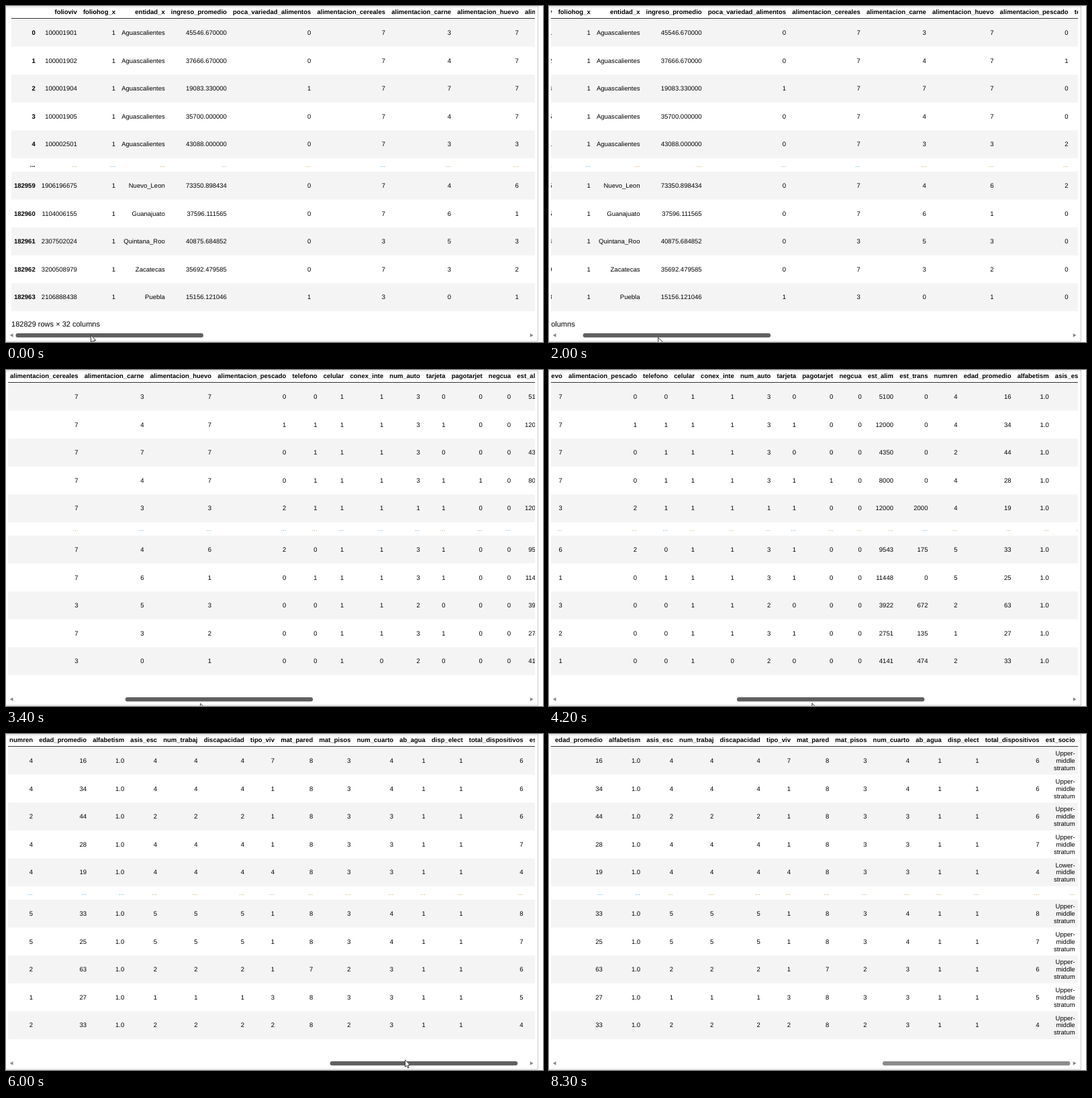
Write an HTML page with a canvas that moves like this. It is 800 by 501 pixels and loops after 8.4 s.

```html
<!DOCTYPE html>
<html lang="es">
<head>
<meta charset="utf-8">
<style>
html, body { margin: 0; width: 100%; height: 100%; overflow: hidden; background: #fff; }
canvas { display: block; }
</style>
</head>
<body>
<canvas id="stage" width="800" height="501"></canvas>
<script>
const ctx = document.getElementById('stage').getContext('2d');
ctx.textRendering = 'geometricPrecision';

const LOOP = 8400, STEP = 100;
const VIEW = { left: 3, right: 788 };
const TABLE = { left: 8, width: 2132.6, indexRight: 43.7, lastRight: 2136.2 };
const HEAD_BOTTOM = 19, ROW_H = 41.6, GAP_H = 20;
const MAX_SCROLL = TABLE.left + TABLE.width - VIEW.right;
const FAMILY = '"Liberation Sans", Arial, sans-serif';
const FONT = '9.52px ' + FAMILY, BOLD = 'bold ' + FONT;
const ORANGE = '#d09a48', BLUE = '#4fa3e0';

const always = value => () => value;
const digits = text => row => text[row];
const words = text => { const list = text.split(' '); return row => list[row]; };
const lateOdd = row => row > 6 && row % 2;
const people = digits('4424455212');

// Each column gives its value for a row from 0 to 9
const columns = Object.entries({
  folioviv: words('100001901 100001902 100001904 100001905 100002501 1906196675 1104006155 2307502024 3200508979 2106888438'),
  foliohog_x: always(1),
  entidad_x: words('Aguascalientes '.repeat(5) + 'Nuevo_Leon Guanajuato Quintana_Roo Zacatecas Puebla'),
  ingreso_promedio: words('45546.670000 37666.670000 19083.330000 35700.000000 43088.000000 73350.898434 37596.111565 40875.684852 35692.479585 15156.121046'),
  poca_variedad_alimentos: row => row % 7 === 2 ? 1 : 0,
  alimentacion_cereales: row => lateOdd(row) ? 3 : 7,
  alimentacion_carne: digits('3474346530'),
  alimentacion_huevo: digits('7777361321'),
  alimentacion_pescado: row => row === 1 ? 1 : row === 4 || row === 5 ? 2 : 0,
  telefono: row => row > 0 && row < 7 && row !== 5 ? 1 : 0,
  celular: always(1),
  conex_inte: row => row < 9 ? 1 : 0,
  num_auto: row => row === 4 ? 1 : lateOdd(row) ? 2 : 3,
  tarjeta: row => (row > 2 && row < 7) || row % 7 === 1 ? 1 : 0,
  pagotarjet: row => row === 3 ? 1 : 0,
  negcua: always(0),
  est_alim: words('5100 12000 4350 8000 12000 9543 11448 3922 2751 4141'),
  est_trans: words('0 0 0 0 2000 175 0 672 135 474'),
  numren: people,
  edad_promedio: words('16 34 44 28 19 33 25 63 27 33'),
  alfabetism: always('1.0'),
  asis_esc: people,
  num_trabaj: people,
  discapacidad: people,
  tipo_viv: digits('7111411132'),
  mat_pared: row => row === 7 ? 7 : 8,
  mat_pisos: row => lateOdd(row) ? 2 : 3,
  num_cuarto: row => row % 5 < 2 ? 4 : 3,
  ab_agua: always(1),
  disp_elect: always(1),
  total_dispositivos: row => row < 3 ? 6 : row < 5 ? 16 - 3 * row : 13 - row,
  est_socio: row => (row === 4 ? 'Lower-' : 'Upper-') + '\nmiddle\nstratum'
}).map(([name, valueAt]) =>
  ({ name, cells: Array.from({ length: 10 }, (_, row) => String(valueAt(row)).split('\n')) }));

function textWidth(text, font) {
  ctx.font = font;
  return ctx.measureText(text).width;
}

// Columns fit their widest text and share the remaining width as padding
function layOutColumns() {
  let spare = TABLE.lastRight - TABLE.indexRight;
  for (const column of columns) {
    const cellWidths = column.cells.flat().map(line => textWidth(line, FONT));
    column.width = Math.max(textWidth(column.name, BOLD), ...cellWidths);
    spare -= column.width;
  }
  let right = TABLE.indexRight;
  for (const column of columns) {
    right += column.width + spare / columns.length;
    column.right = right;
  }
}

const scrollKeys = [[0, 0], [900, 0], [1400, 28.5], [2600, 212], [4200, 744],
  [5300, 1066.5], [6000, 1312.5], [6200, MAX_SCROLL], [LOOP, MAX_SCROLL]];
const cursorYKeys = [[0, 491], [1400, 491], [2600, 497.5], [4200, 497], [5300, 493], [6000, 486], [6300, 502]];

const segment = (keys, t) => Math.max(0, keys.findIndex(key => key[0] > t) - 1);

function linear(keys, t) {
  const i = segment(keys, t), [t0, a] = keys[i], [t1, b] = keys[i + 1];
  return a + (b - a) * (t - t0) / (t1 - t0);
}

// Monotone cubic interpolation
function smooth(keys, t) {
  const slope = i => (keys[i + 1][1] - keys[i][1]) / (keys[i + 1][0] - keys[i][0]);
  const tangent = i => {
    if (i === 0 || i === keys.length - 1) return 0;
    const a = slope(i - 1), b = slope(i);
    return a * b > 0 ? 2 * a * b / (a + b) : 0;
  };
  const i = segment(keys, t), [t0, a] = keys[i], [t1, b] = keys[i + 1];
  const h = t1 - t0, u = (t - t0) / h, v = 1 - u;
  return a * v * v * (1 + 2 * u) + b * u * u * (3 - 2 * u)
    + h * u * v * (tangent(i) * v - tangent(i + 1) * u);
}

const rowTop = row => HEAD_BOTTOM + row * ROW_H + (row > 4 ? GAP_H : 0);
const baseline = row => rowTop(row) + 24;

function box(x, y, w, h, color) {
  ctx.fillStyle = color;
  ctx.fillRect(x, y, w, h);
}

function label(text, x, y, font = FONT, color = '#000', align = 'right') {
  ctx.font = font;
  ctx.fillStyle = color;
  ctx.textAlign = align;
  ctx.fillText(text, x, y);
}

function polygon(points, fill, stroke) {
  ctx.beginPath();
  points.forEach(([x, y]) => ctx.lineTo(x, y));
  ctx.closePath();
  ctx.fillStyle = fill;
  ctx.fill();
  if (stroke) {
    ctx.strokeStyle = stroke;
    ctx.lineWidth = 0.9;
    ctx.stroke();
  }
}

function drawTable(scroll) {
  const gapBase = rowTop(4) + ROW_H + 13.4;
  const shifted = scroll % 1 >= 0.5;
  ctx.save();
  ctx.beginPath();
  ctx.rect(VIEW.left, 0, VIEW.right - VIEW.left, 486);
  ctx.clip();
  ctx.translate(-scroll, 0);

  for (let row = 0; row < 10; row++) {
    const striped = (row + (row > 4)) % 2 === 0;
    if (striped) box(TABLE.left, rowTop(row), TABLE.width, ROW_H, '#f4f4f5');
    label(row < 5 ? row : 182954 + row, TABLE.indexRight, baseline(row), BOLD);
  }
  // The row of dots takes one turn in the striping
  box(TABLE.left, 18, TABLE.width, 1, '#333');
  label('...', TABLE.indexRight, gapBase, BOLD);

  columns.forEach(({ name, right, cells }, i) => {
    const blue = (i % 4 === 1 || i > 21) !== shifted;
    label(name, right, 11.7, BOLD);
    label('...', right, gapBase, FONT, blue ? BLUE : ORANGE);
    cells.forEach((lines, row) => lines.forEach((line, n) =>
      label(line, right, baseline(row) + (n - (lines.length - 1) / 2) * 10.9)));
  });
  label('182829 rows × 32 columns', TABLE.left, 477.6, '11.02px ' + FAMILY, '#000', 'left');
  ctx.restore();
}

function drawScrollbar(thumbX, active) {
  polygon([[10.5, 488.3], [10.5, 493.7], [5.8, 491]], '#868686');
  polygon([[780.8, 488.3], [780.8, 493.7], [785.5, 491]], '#868686');
  ctx.fillStyle = active ? '#606060' : '#8b8b8b';
  ctx.beginPath();
  ctx.roundRect(thumbX, 487.9, 279.5, 6.4, 3.2);
  ctx.fill();
}

function drawCursor(x, y) {
  const outline = [[0, 0], [0, 10.5], [2.4, 8.4], [4, 12], [5.6, 11.3], [4.1, 7.8], [7.3, 7.6]];
  polygon(outline.map(([dx, dy]) => [x + dx, y + dy]), '#fff', '#222');
}

function drawFrame() {
  const shade = ctx.createLinearGradient(0, 0, 0, 4);
  shade.addColorStop(0, '#e2e2e2');
  shade.addColorStop(1, '#fff');
  box(0, 0, 800, 501, '#fff');
  box(0, 0, 792, 4, shade);
  box(792, 0, 1, 500, '#c9c9c9');
  box(0, 499.5, 793, 1, '#c9c9c9');
}

function draw(t) {
  const scroll = smooth(scrollKeys, t);
  const thumbX = 14.5 + scroll / MAX_SCROLL * 482.5;
  drawFrame();
  drawTable(scroll);
  drawScrollbar(thumbX, t < 6400);
  if (t < 6300) drawCursor(thumbX + 112, linear(cursorYKeys, t));
}

layOutColumns();
const start = performance.now();
function tick() {
  const t = (performance.now() - start) % LOOP;
  draw(Math.floor(t / STEP) * STEP);
  requestAnimationFrame(tick);
}
tick();
</script>
</body>
</html>
```
